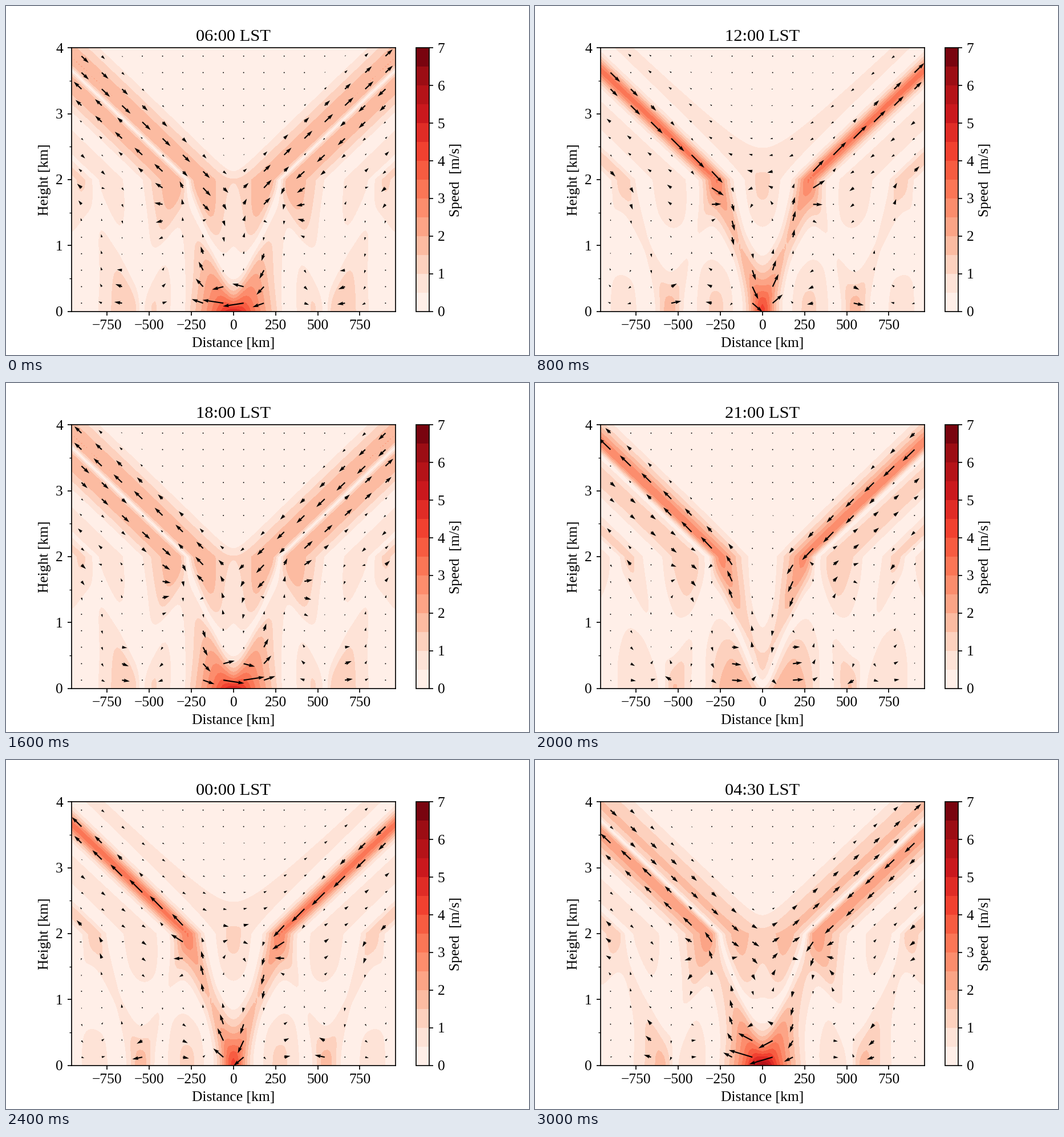
Recreate the animation shown at these times as a matplotlib script. Size 917 by 611 pixels, loop 3.2 s.

```python
import numpy as np
import matplotlib.pyplot as plt
from matplotlib.animation import FuncAnimation
from matplotlib.cm import ScalarMappable
from matplotlib.colors import BoundaryNorm, ListedColormap

plt.rcParams.update({"font.family": "Liberation Serif", "font.size": 12})

# Linear sea breeze over a two-layer atmosphere (lengths in km)
OMEGA = 2 * np.pi / 86400
N1, N2 = 0.01, 0.03
DEPTH, TOP = 1.0, 2.0          # heating scale height, layer interface
COAST = 50.0                   # half width of the coastal heating gradient
Q0 = 1.2e-5
FRAMES = 16
DPI = 917 / 6

unit = N1 * DEPTH / OMEGA
ratio = N2 / N1
amp = Q0 / (np.pi * OMEGA * N1)

x = np.linspace(-7, 7, 129)
z = np.linspace(0, 4, 129)


def solve():
    """Complex amplitudes of u and w on the (z, x) grid."""
    dq = 0.02
    q = (np.arange(2500) + 0.5) * dq
    low, high = 1 / (1 + q**2), 1 / (1 + (ratio * q)**2)
    decay = np.exp(-TOP)
    up, down = np.exp(-1j * q * TOP), np.exp(1j * q * TOP)
    jump = (low - high) * decay
    b = ((ratio - 1) * low * up + jump * (1 - 1j * ratio * q) / (1j * q)) \
        / ((ratio + 1) * down - (ratio - 1) * up)
    c = -low - b
    d = jump + b * down + c * up

    zz = z[:, None]
    heat = np.exp(-zz)
    rise, sink = np.exp(-1j * q * zz), np.exp(1j * q * zz)
    beam = d * np.exp(-1j * ratio * q * (zz - TOP))
    below = zz <= TOP
    psi = np.where(below, low * heat + b * sink + c * rise, high * heat + beam)
    shear = np.where(below, -low * heat + 1j * q * (b * sink - c * rise),
                     -high * heat - 1j * ratio * q * beam)

    weight = amp * dq * np.exp(-q * COAST / unit)
    phase = np.outer(q, x)
    u = (shear * weight) @ np.cos(phase)
    w = (psi * weight * q) @ np.sin(phase) * OMEGA / N1
    return u, w


u_hat, w_hat = solve()
dist = x * unit

levels = np.arange(0, 7.5, 0.5)
cmap = ListedColormap(plt.get_cmap("Reds")((levels[:-1] + 0.25) / 7))
norm = BoundaryNorm(levels, cmap.N)

fig = plt.figure(figsize=(917 / DPI, 611 / DPI), dpi=DPI)
ax = fig.add_axes([0.125, 0.125, 0.62, 0.755])
cax = fig.add_axes([0.78375, 0.125, 0.02515, 0.755])

ax.set(xlim=(dist[0], dist[-1]), ylim=(0, 4),
       xlabel="Distance [km]", ylabel="Height [km]")
ax.set_xticks(range(-750, 751, 250))
ax.set_yticks(range(5))
ax.set_yticks(np.arange(0.5, 4, 1), minor=True)
title = ax.set_title("")

bar = fig.colorbar(ScalarMappable(norm, cmap), cax=cax, ticks=range(8))
bar.set_label("Speed  [m/s]")
bar.minorticks_off()

pick = (slice(4, None, 8), slice(4, None, 8))
arrows = ax.quiver(dist[pick[1]], z[pick[0]], u_hat.real[pick], w_hat.real[pick],
                   angles="xy", scale=55, zorder=3)
filled = []


def draw(i):
    turn = np.exp(-2j * np.pi * i / FRAMES)
    u, w = (u_hat * turn).real, (w_hat * turn).real
    while filled:
        filled.pop().remove()
    filled.append(ax.contourf(dist, z, np.hypot(u, w), levels,
                              cmap=cmap, norm=norm, zorder=1))
    arrows.set_UVC(u[pick], w[pick])
    minutes = (360 + 90 * i) % 1440
    title.set_text(f"{minutes // 60:02d}:{minutes % 60:02d} LST")


anim = FuncAnimation(fig, draw, frames=FRAMES, init_func=lambda: None,
                     interval=200, repeat=True, repeat_delay=0)
plt.show()
```
